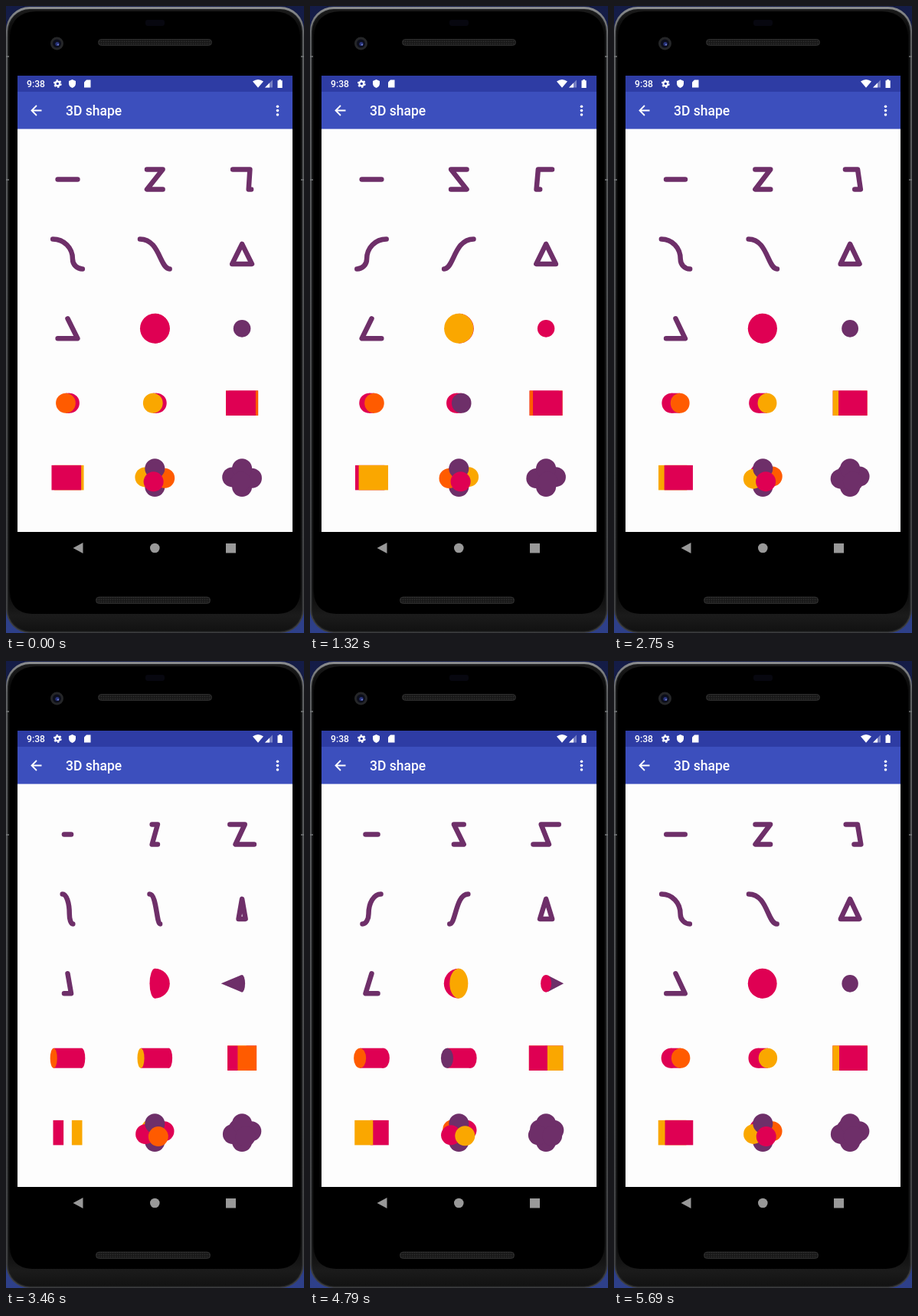
Write an HTML page with a canvas that moves like this. It is 389x819 px and loops after 5790 ms.

```html
<!DOCTYPE html>
<html lang="en">
<head>
<meta charset="utf-8">
<title>3D shape</title>
<style>
  html, body { margin: 0; width: 100%; height: 100%; overflow: hidden; background: linear-gradient(#141c46, #2e408a); }
  svg, canvas { position: absolute; left: 0; top: 0; width: 389px; height: 819px; }
  text { font-family: Roboto, sans-serif; font-weight: 500; fill: #fff; }
</style>
</head>
<body>
<svg viewBox="0 0 389 819">
  <defs>
    <linearGradient id="rim" x1="0" y1="0" x2="0" y2="1">
      <stop offset="0" stop-color="#8b8d8f"/>
      <stop offset=".05" stop-color="#5c5e60"/>
      <stop offset="1" stop-color="#3c3d3f"/>
    </linearGradient>
    <linearGradient id="chin" x1="0" y1="0" x2="0" y2="1">
      <stop offset="0" stop-color="#1a1a1a"/>
      <stop offset=".04" stop-color="#070707"/>
      <stop offset=".93" stop-color="#070707"/>
      <stop offset=".975" stop-color="#1b1b1b"/>
      <stop offset="1" stop-color="#121212"/>
    </linearGradient>
    <pattern id="mesh" width="3" height="3" patternUnits="userSpaceOnUse">
      <rect width="3" height="3" fill="#191919"/>
      <circle cx="1.5" cy="1.5" r=".8" fill="#303030"/>
    </pattern>
  </defs>

  <!-- Phone body -->
  <rect x="0" y="1" width="389" height="818" rx="31" fill="url(#rim)"/>
  <rect x="2" y="4" width="385" height="813.5" rx="29" fill="#1d1e1f"/>
  <rect x="3.5" y="5" width="382" height="811.5" rx="28" fill="url(#chin)"/>
  <path d="M5 40V765Q6 793 34 794H355Q383 793 384 765V40Q382 8 350 7H39Q7 8 5 40Z" fill="#000"/>
  <path d="M0 66H4M0 227H4M385 66H389M385 227H389" stroke="#77797b" stroke-width="1.5"/>
  <rect x="182" y="18" width="25" height="8" rx="3" fill="#07070f"/>
  <circle cx="66.5" cy="49" r="8.5" fill="#252628"/>
  <circle cx="66.5" cy="49" r="5.5" fill="#0c0e1b"/>
  <circle cx="67" cy="49.5" r="2.6" fill="#28337a"/>
  <circle cx="68" cy="50.5" r="1" fill="#7d8bd8"/>
  <g fill="url(#mesh)" stroke="#353535" stroke-width=".8">
    <rect x="120.5" y="43.5" width="148" height="8" rx="4"/>
    <rect x="117.5" y="772" width="149" height="8.5" rx="4"/>
  </g>

  <!-- Screen -->
  <rect x="15" y="91" width="359" height="596" fill="#fdfdfd"/>
  <rect x="15" y="91" width="359" height="21" fill="#2e3ca4"/>
  <rect x="15" y="112" width="359" height="48.6" fill="#3c4fbd"/>
  <text x="27" y="106" font-size="12.2">9:38</text>
  <text x="78" y="143" font-size="17.5">3D shape</text>
  <g fill="#fff">
    <circle cx="67.3" cy="101.5" r="2.9" fill="none" stroke="#fff" stroke-width="2.2"/>
    <circle cx="67.3" cy="101.5" r="4.6" fill="none" stroke="#fff" stroke-width="1.6" stroke-dasharray="2.4 2.417"/>
    <path d="M86.5 96l4.5 2v3.3q0 4-4.5 5.7q-4.5-1.7-4.5-5.7V98z"/>
    <path d="M105 96.5h5.5v10h-8.5v-7z"/>
    <path d="M322 98.5q7-5 14 0l-7 8.3z"/>
    <path d="M338 106.5l10-10v10z" opacity=".35"/>
    <path d="M338 106.5l6-6v6z"/>
    <path d="M354.5 97.3h1.7V96h2.8v1.3h1.7v9.7h-6.2z"/>
    <circle cx="354.5" cy="131.2" r="1.8"/>
    <circle cx="354.5" cy="136.6" r="1.8"/>
    <circle cx="354.5" cy="142" r="1.8"/>
  </g>
  <path d="M46.5 136.5H34M40 130l-6.5 6.5l6.5 6.5" fill="none" stroke="#fff" stroke-width="1.8"/>
  <g fill="#999">
    <path d="M87.5 708l13-7v14z"/>
    <circle cx="194.3" cy="708" r="6.3"/>
    <rect x="287" y="702" width="13" height="12.5"/>
  </g>
</svg>
<canvas id="stage"></canvas>

<script>
const LOOP = 5790, STEP = 88.9, STEP_LEAD = 16, LAST_STEP = 64;
const START_ANGLE = -0.13, SPEED = -2.125 / 1000;   // radians, radians per ms
const SCALE = 0.325, TILT = 0.42;
const PURPLE = '#6e2f69', ROSE = '#df0053', ORANGE = '#ff5b00', YELLOW = '#faa700';

const canvas = document.getElementById('stage');
const ctx = canvas.getContext('2d');
const ratio = window.devicePixelRatio || 1;
canvas.width = 389 * ratio;
canvas.height = 819 * ratio;

let sin, cos;   // of the current turn about the vertical axis
const turnX = (x, z = 0) => x * cos + z * sin;
const turnZ = (x, z = 0) => z * cos - x * sin;

function fill(color) {
  ctx.fillStyle = color;
  ctx.fill();
}

function ellipse(x, y, rx, ry, color) {
  ctx.beginPath();
  ctx.ellipse(x, y, Math.abs(rx), ry, 0, 0, 2 * Math.PI);
  fill(color);
}

function stroke(trace) {
  ctx.beginPath();
  trace();
  ctx.strokeStyle = PURPLE;
  ctx.lineWidth = 20;
  ctx.lineCap = ctx.lineJoin = 'round';
  ctx.stroke();
}

function polyline(points, closed = false) {
  stroke(() => {
    for (const [x, y, z] of points) ctx.lineTo(turnX(x, z), y);
    if (closed) ctx.closePath();
  });
}

function curveTo(x1, y1, x2, y2, x, y) {
  ctx.bezierCurveTo(turnX(x1), y1, turnX(x2), y2, turnX(x), y);
}

// Quarter arc through a corner, with handles 9/16 of the way to it
function arcTo(x0, y0, cx, cy, x, y) {
  const toward = (a, b) => a + (b - a) * 9 / 16;
  curveTo(toward(x0, cx), toward(y0, cy), toward(x, cx), toward(y, cy), x, y);
}

function arcs() {
  stroke(() => {
    ctx.moveTo(turnX(-60), -60);
    arcTo(-60, -60, 20, -60, 20, 20);
    arcTo(20, 20, 20, 60, 60, 60);
  });
}

function bezier() {
  stroke(() => {
    ctx.moveTo(turnX(-60), -60);
    curveTo(20, -60, 20, 60, 60, 60);
  });
}

function hemisphere() {
  ctx.beginPath();
  ctx.arc(0, 0, 60, -Math.PI / 2, Math.PI / 2, sin > 0);
  fill(ROSE);
  ellipse(0, 0, 60 * cos, 60, cos > 0 ? ROSE : YELLOW);
}

function cone() {
  const radius = 35, apex = turnX(0, 90);
  const k = radius * Math.abs(cos) / Math.abs(apex);
  if (k < 1) {   // the apex lies outside the base: join it by tangents
    const x = radius * Math.abs(cos) * k * Math.sign(apex);
    const y = radius * Math.sqrt(1 - k * k);
    ctx.beginPath();
    ctx.moveTo(apex, 0);
    ctx.lineTo(x, y);
    ctx.lineTo(x, -y);
    fill(PURPLE);
  }
  ellipse(0, 0, radius * cos, radius, cos > 0 ? PURPLE : ROSE);
}

function cylinder(frontColor, backColor) {
  const near = turnX(0, cos > 0 ? 60 : -60);
  ellipse(-near, 0, 40 * cos, 40, ROSE);
  ctx.fillStyle = ROSE;
  ctx.fillRect(-Math.abs(near), -40, 2 * Math.abs(near), 80);
  ellipse(near, 0, 40 * cos, 40, cos > 0 ? frontColor : backColor);
}

// A face is an upright wall from (x1, z1) to (x2, z2) in the floor plan
function box(faces) {
  const depth = ([x1, z1, x2, z2]) => turnZ(x1 + x2, z1 + z2);
  faces.sort((a, b) => depth(a) - depth(b));
  for (const [x1, z1, x2, z2, color] of faces) {
    const left = turnX(x1, z1);
    ctx.fillStyle = color;
    ctx.fillRect(left, -50, turnX(x2, z2) - left, 100);
  }
}

const frontFace = [-60, 40, 60, 40, ROSE];
const backFace = color => [-60, -40, 60, -40, color];
const leftFace = [-60, -40, -60, 40, YELLOW];
const rightFace = [60, -40, 60, 40, ORANGE];

function balls(top, left, right, middle) {
  [[0, -40, 0, top], [0, 40, 0, top], [-40, 0, 0, left],
   [40, 0, 0, right], [0, 0, 40, middle], [0, 0, -40, middle]]
    .map(([x, y, z, color]) => {
      const depth = turnZ(x, z);
      return {
        x: turnX(x, z),
        y: y * Math.cos(TILT) + depth * Math.sin(TILT),
        z: depth * Math.cos(TILT) - y * Math.sin(TILT),
        color
      };
    })
    .sort((a, b) => a.z - b.z)
    .forEach(b => ellipse(b.x, b.y, 40, 40, b.color));
}

const triangle = [[0, -40], [40, 40], [-40, 40]];
const shapes = [
  () => polyline([[-40, 0], [40, 0]]),
  () => polyline([[-32, -40], [32, -40], [-32, 40], [32, 40]]),
  () => polyline([[-32, -40, 40], [32, -40, 0], [32, 40, 40], [32, 40, -40]]),
  arcs,
  bezier,
  () => polyline(triangle, true),
  () => polyline(triangle),
  hemisphere,
  cone,
  () => cylinder(ORANGE, ORANGE),
  () => cylinder(YELLOW, PURPLE),
  () => box([frontFace, backFace(ROSE), leftFace, rightFace]),
  () => box([frontFace, backFace(YELLOW)]),
  () => balls(PURPLE, YELLOW, ORANGE, ROSE),
  () => balls(PURPLE, PURPLE, PURPLE, PURPLE)
];

function draw(time) {
  const step = Math.min(LAST_STEP, Math.floor((time % LOOP + STEP_LEAD) / STEP));
  const angle = START_ANGLE + SPEED * step * STEP;
  sin = Math.sin(angle);
  cos = Math.cos(angle);
  ctx.setTransform(ratio, 0, 0, ratio, 0, 0);
  ctx.clearRect(0, 0, 389, 819);
  shapes.forEach((shape, i) => {
    ctx.save();
    ctx.translate(80.5 + i % 3 * 113.8, 226.5 + Math.floor(i / 3) * 97.4);
    ctx.scale(SCALE, SCALE);
    shape();
    ctx.restore();
  });
}

const start = performance.now();
function tick() {
  draw(performance.now() - start);
  requestAnimationFrame(tick);
}
tick();
</script>
</body>
</html>
```
